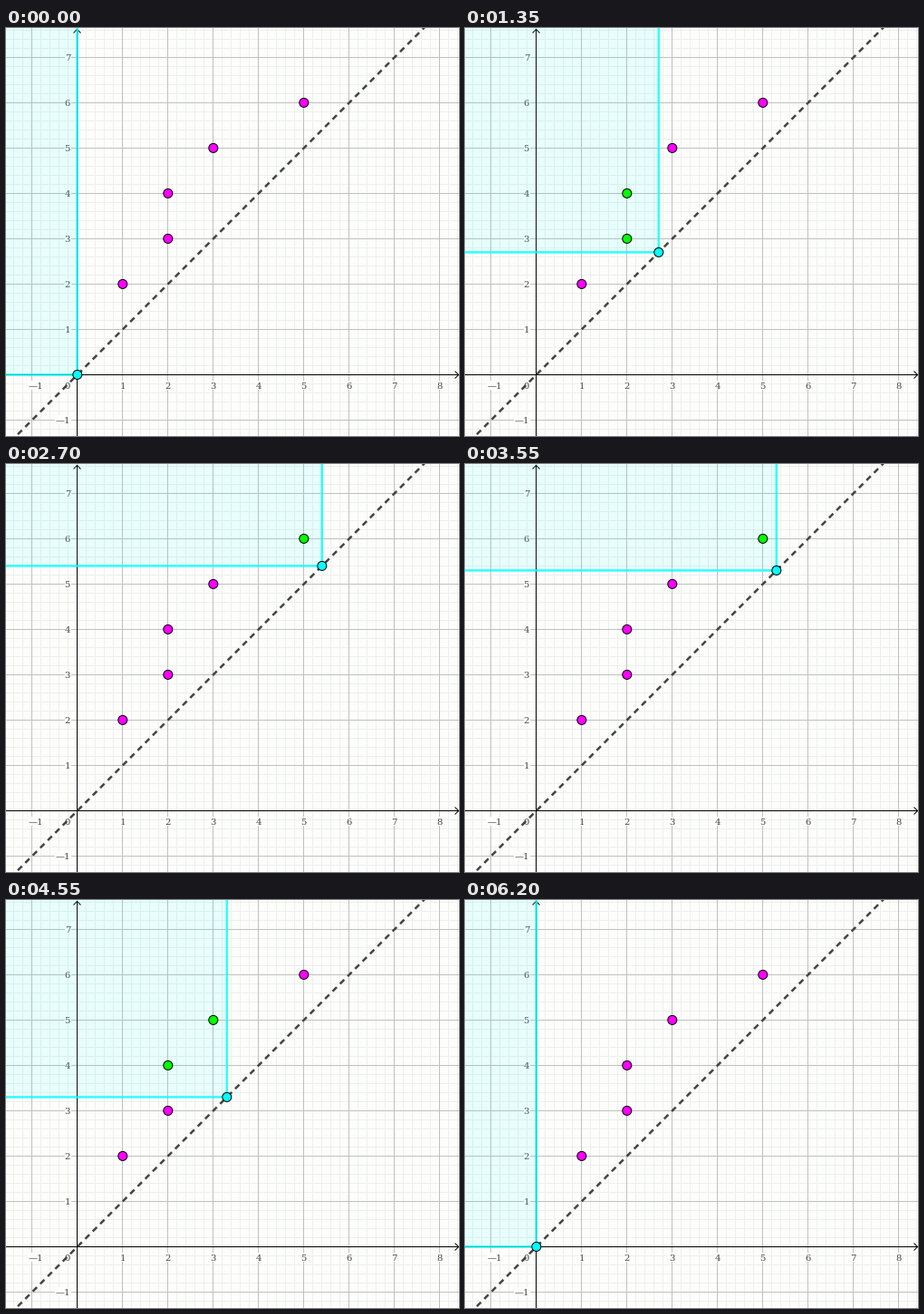
A matplotlib script that plays this animation: 500 px wide and 450 px high, repeating every 6.25 s.

```python
from math import floor

import matplotlib.pyplot as plt
from matplotlib.animation import FuncAnimation
from matplotlib.patches import Circle, Rectangle

W, H = 500, 450
OX, OY, UNIT = 78.8, 382.4, 50
FRAMES, STEP_MS = 125, 50
PEAK = FRAMES // 2
PT = 0.72  # points per pixel at 100 dpi

PAPER, MINOR, MAJOR = "#fdfefc", "#eef0ec", "#c0c0c0"
CYAN, MAGENTA, GREEN = "#00ffff", "#ff00ff", "#00ff00"
POINTS = [(1, 2), (2, 3), (2, 4), (3, 5), (5, 6)]

fig = plt.figure(figsize=(5, 4.5), dpi=100, facecolor=PAPER)
ax = fig.add_axes([0, 0, 1, 1])
ax.set_xlim(0, W)
ax.set_ylim(H, 0)
ax.axis("off")


def px(x, y):
    return OX + UNIT * x, OY - UNIT * y


def crisp(v):
    """Centre of the pixel that holds v."""
    return floor(v) + 0.5


def line(xs, ys, color, width=1, z=1, **kw):
    kw.setdefault("solid_capstyle", "butt")
    return ax.plot(xs, ys, color=color, lw=width * PT, zorder=z,
                   snap=False, **kw)[0]


def label(text, x, base, align="center"):
    ax.text(x, base, text, ha=align, va="baseline", color="#444444",
            family="DejaVu Serif", fontsize=10 * PT, zorder=4)


def dot(x, y, color, z):
    c = Circle(px(x, y), 5, fc=color, ec="black", lw=PT, zorder=z)
    return ax.add_patch(c)


def mask(x, y, w, h):
    ax.add_patch(Rectangle((x, y), w, h, fc=PAPER, lw=0, zorder=2.5))


def draw_grid():
    for i in range(-7, 43):
        color, z = (MAJOR, 2) if i % 5 == 0 else (MINOR, 1)
        x, y = map(crisp, px(i / 5, i / 5))
        line([x, x], [0, H], color, z=z)
        line([0, W], [y, y], color, z=z)


def draw_axes():
    x0, y0 = crisp(OX), crisp(OY)
    line([0, W], [y0, y0], "black", z=3)
    line([x0, x0], [1, H], "black", z=3)
    line([W - 4.5, W - 0.5, W - 4.5], [y0 - 4, y0, y0 + 4], "black", z=3)
    line([x0 - 4, x0, x0 + 4], [5.5, 1.5, 5.5], "black", z=3)
    label("0", 68, 398)
    for n in [-1, *range(1, 9)]:
        x, y = px(n, n)
        text = str(n) if n > 0 else "\u20141"
        wide = 7 if n > 0 else 18
        cx = x if n > 0 else x + 4
        mask(cx - wide / 2, 389, wide, 10)
        label(text, cx, 398)
        if n < 8:
            mask(72 - wide, y - 5, wide, 10)
            label(text, 71, y + 4, "right")


draw_grid()
draw_axes()

region = ax.add_patch(Rectangle((0, 0), 1, 1, fc=CYAN, alpha=0.085, lw=0, zorder=5))
border = line([], [], CYAN, 2.5, 6, alpha=0.8, solid_joinstyle="miter")
line([13, OX + OY + 1], [OX + OY - 13, -1], "#444444", 2.5, 7,
     dashes=(2.6, 2.08), dash_capstyle="butt")
dots = [dot(x, y, MAGENTA, 8) for x, y in POINTS]
corner = dot(0, 0, CYAN, 9)


def update(k):
    t = (PEAK - abs(k - PEAK)) / 10
    x, y = px(t, t)
    region.set_width(x)
    region.set_height(y)
    border.set_data([-5, x, x], [y, y, -5])
    corner.center = x, y
    for d, (birth, death) in zip(dots, POINTS):
        d.set_facecolor(GREEN if birth <= t < death else MAGENTA)
    return [region, border, corner, *dots]


anim = FuncAnimation(fig, update, frames=FRAMES, interval=STEP_MS,
                     repeat=True, repeat_delay=0, blit=False)
plt.show()
```
